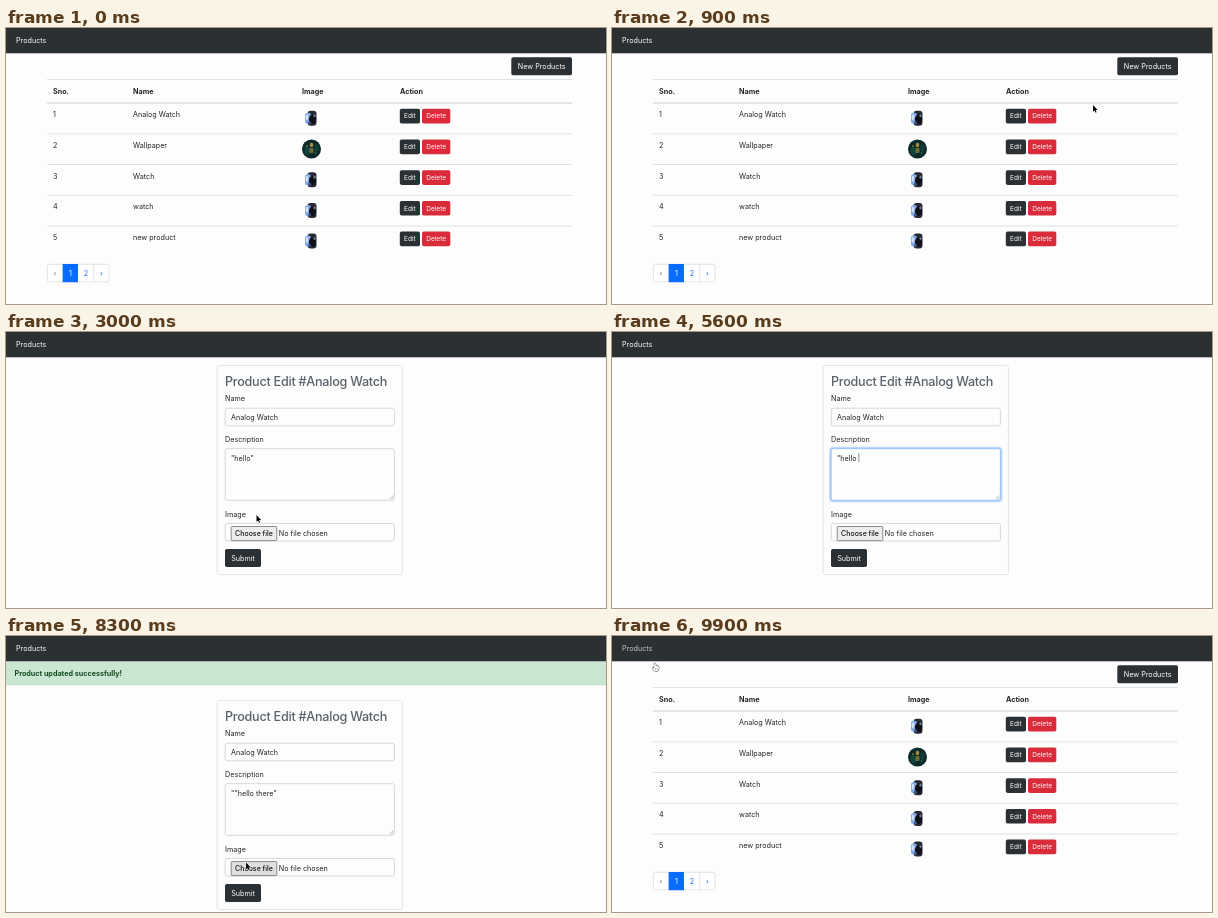
Animation, 600 px wide and 276 px high, one loop 10000 ms. Source, as an HTML page with a canvas:

```html
<!DOCTYPE html>
<html lang="en">
<head>
<meta charset="utf-8">
<title>Products</title>
<style>
  html, body { margin: 0; width: 100%; height: 100%; overflow: hidden; background: #fdfdfd; }
  canvas { display: block; width: 600px; height: 276px; }
</style>
</head>
<body>
<canvas id="stage"></canvas>
<script>
const W = 600, H = 276, LOOP = 10000, STEP = 100;
const FONT = 'Inter, Roboto, sans-serif';
const BODY = 7.2;
const C = {
  page: '#fdfdfd', dark: '#2b3035', darkHover: '#1d2125', red: '#d92b39', blue: '#0a6cff',
  text: '#212529', line: '#dadde0', field: '#cbd0d5', hover: '#e3e3e3',
  alert: '#cbe7d2', alertText: '#124d22', title: '#59626a'
};
const canvas = document.getElementById('stage');
const ctx = canvas.getContext('2d');
const ratio = window.devicePixelRatio || 1;
canvas.width = W * ratio;
canvas.height = H * ratio;

const ROW_TOP = 75, ROW_H = 30.7;
const rows = ['Analog Watch', 'Wallpaper', 'Watch', 'watch', 'new product'];

// Pointer path: time, x, y, shape; gaps in time are left hidden.
const paths = [
  [[300, 492, 257, 'arrow'], [600, 488, 160, 'arrow'], [900, 481, 77, 'arrow'],
   [1000, 481, 72, 'arrow'], [1300, 470, 81, 'arrow'], [1800, 404, 88, 'hand'],
   [2400, 404, 88, 'arrow'], [2600, 384, 53, 'arrow'], [3000, 250.5, 183, 'arrow'],
   [3300, 258, 150, 'beam'], [3500, 262, 140, 'beam'], [3900, 262, 140, 'beam']],
  [[6800, 262, 140, 'beam'], [7100, 254, 180, 'arrow'], [7500, 238, 230, 'hand'],
   [7900, 238, 232, 'arrow'], [8300, 240, 226.5, 'arrow'], [8900, 240, 73, 'arrow'],
   [9300, 26, 13, 'hand'], [9500, 26, 13, 'hand'], [9900, 43, 27, 'hand'], [10000, 43, 27, 'hand']]
];

function pointerAt(t) {
  for (const path of paths) {
    for (let i = 0; i < path.length - 1; i++) {
      const [t0, x0, y0, shape] = path[i], [t1, x1, y1] = path[i + 1];
      if (t >= t0 && t < t1) {
        const k = (t - t0) / (t1 - t0);
        return { x: x0 + (x1 - x0) * k, y: y0 + (y1 - y0) * k, shape };
      }
    }
  }
  return null;
}

function text(str, x, y, { size = BODY, weight = 400, color = C.text, align = 'left', track = 0 } = {}) {
  ctx.font = `${weight} ${size}px ${FONT}`;
  ctx.letterSpacing = track + 'px';
  ctx.textAlign = align;
  ctx.fillStyle = color;
  ctx.fillText(str, x, y + size * 0.36);
  return ctx.measureText(str).width;
}

function rect(x, y, w, h, color) {
  ctx.fillStyle = color;
  ctx.fillRect(x, y, w, h);
}

function box(x, y, w, h, r, fill, stroke, lw = 0.8) {
  ctx.beginPath();
  ctx.roundRect(x, y, w, h, r);
  if (fill) { ctx.fillStyle = fill; ctx.fill(); }
  if (stroke) { ctx.strokeStyle = stroke; ctx.lineWidth = lw; ctx.stroke(); }
}

function disc(x, y, rx, ry, color, turn = 0) {
  ctx.beginPath();
  ctx.ellipse(x, y, rx, ry, turn, 0, Math.PI * 2);
  ctx.fillStyle = color;
  ctx.fill();
}

function inside(p, x, y, w, h) {
  return p && p.x >= x && p.x <= x + w && p.y >= y && p.y <= y + h;
}

function button(label, x, y, w, h, color, p, size = BODY) {
  const over = inside(p, x, y, w, h) && p.shape === 'hand';
  box(x, y, w, h, 1.8, over && color === C.dark ? C.darkHover : color);
  text(label, x + w / 2, y + h / 2, { size, color: '#fff', align: 'center' });
}

function watch(x, y) {
  disc(x, y, 9.5, 9.5, '#fff');
  box(x - 4, y - 7.5, 9, 15, 3, '#252a35');
  box(x - 6.5, y - 5.5, 6, 11, 2.5, '#86a9e6');
  disc(x - 4.5, y - 1, 1.3, 3, '#d3e2fb');
  disc(x + 1, y + 1, 3.6, 4.8, '#0e1118');
  disc(x + 3, y - 2.5, 1.2, 1.4, '#6d7889');
  disc(x - 2, y + 4.5, 1.6, 1.6, '#3d5688');
}

function wallpaper(x, y) {
  disc(x, y, 9.5, 9.5, '#0c2a2a');
  disc(x - 4, y + 2, 3, 4, '#12443f');
  disc(x + 5, y - 1, 2.2, 4, '#123e3b');
  disc(x, y - 4, 1.8, 2.2, '#a98a38');
  box(x - 2, y - 1, 4, 5, 1, '#6e6a33');
  disc(x - 4.5, y - 3, 0.8, 0.8, '#c29a3e');
  disc(x + 4, y + 4, 0.8, 0.8, '#3a8a78');
}

function navbar(t) {
  rect(0, 0, W, 25, C.dark);
  rect(0, 25, W, 0.5, '#80848a');
  text('Products', 10, 12.6, { color: t >= 9200 ? '#c6c8ca' : '#fff' });
}

function listPage(p) {
  button('New Products', 505.3, 29.3, 60.7, 18, C.dark, p);
  rect(41, 51, 525, 0.8, C.line);
  const heads = { 'Sno.': 47, Name: 127, Image: 296, Action: 394 };
  for (const name in heads) text(name, heads[name], 63, { weight: 700 });

  rows.forEach((name, i) => {
    const top = ROW_TOP + i * ROW_H, mid = top + 11.8;
    const probe = p && { x: p.x, y: p.y - 3 };
    if (inside(probe, 41, top, 525, ROW_H - 0.1)) rect(41, top, 525, ROW_H, C.hover);
    rect(41, top - (i ? 0.2 : 0.6), 525, i ? 0.8 : 1.2, i ? C.line : '#d3d6d9');
    text(String(i + 1), 47, mid);
    text(name, 127, mid);
    (i === 1 ? wallpaper : watch)(305.5, top + 15.3);
    button('Edit', 393.8, top + 5.8, 20.2, 14.7, C.dark, p, 6.5);
    button('Delete', 416, top + 5.8, 28.3, 14.7, C.red, p, 6.5);
  });

  box(41.4, 236.3, 61.6, 17.6, 2, '#fff', C.line);
  rect(56.6, 236, 15.4, 18.2, C.blue);
  rect(87.4, 236.3, 0.8, 17.6, C.line);
  ['‹', '1', '2', '›'].forEach((s, i) => {
    const color = i === 0 ? '#5d666e' : i === 1 ? '#fff' : C.blue;
    text(s, 48.9 + i * 15.5, 245, { color, align: 'center' });
  });
}

function description(t) {
  if (t >= 7900) return '""hello there"';
  if (t < 3900) return '"hello"';
  if (t < 4100) return '"hello';
  const typed = t < 5800 ? 0 : Math.min(5, Math.floor((t - 5800) / 100) + 1);
  return '"hello ' + 'there'.slice(0, typed);
}

function caretOn(t) {
  if (t < 3500 || t >= 7700) return false;
  if (t < 4800 || (t >= 5800 && t < 6300)) return true;
  return Math.floor((t - 4800) / 500) % 2 === 1;
}

function editPage(t, p) {
  const saved = t >= 7900, dy = saved ? 31 : 0;
  if (saved) {
    rect(0, 25, W, 24, C.alert);
    rect(0, 48.5, W, 0.7, '#bcdcc5');
    text('Product updated successfully!', 8.5, 37.5, { weight: 700, color: C.alertText });
  }
  ctx.save();
  ctx.translate(0, dy);
  const q = p && { ...p, y: p.y - dy };

  box(211.2, 33.6, 185.2, 209, 2, C.page, '#dcdddf');
  text('Product Edit #Analog Watch', 219, 49.3, { size: 12.6, weight: 500, color: C.title, track: -0.25 });
  text('Name', 219, 66.8);
  box(219.2, 76.2, 169.2, 17.6, 2, C.page, C.field);
  text('Analog Watch', 225, 85.2);

  text('Description', 219, 107.2);
  const focus = t < 3500 || t >= 7700 ? 0 : Math.min(1, (t - 3400) / 300);
  if (focus) box(218.2, 115.7, 171.2, 53.6, 3, null, `rgba(10,120,255,${0.27 * focus})`, 2);
  box(219.2, 116.7, 169.2, 51.6, 2, C.page, focus ? '#82b7f8' : C.field);
  const w = text(description(t), 225, 126);
  if (caretOn(t)) rect(225 + w, 121, 0.6, 9, '#4a4d50');
  ctx.beginPath();
  ctx.moveTo(383.7, 167.2); ctx.lineTo(387.4, 163.5);
  ctx.moveTo(385.8, 167.2); ctx.lineTo(387.4, 165.6);
  ctx.strokeStyle = '#85888b';
  ctx.lineWidth = 0.6;
  ctx.stroke();

  text('Image', 219, 182);
  box(219.2, 191.4, 169.2, 17.6, 2, C.page, C.field);
  const over = inside(q, 225, 194, 46, 14.5);
  box(225.2, 194.5, 45.6, 14.1, 1, over ? '#dedede' : '#ededed', '#6f7276', 0.8);
  text('Choose file', 248, 201.8, { size: 7, weight: 500, color: '#111', align: 'center' });
  text('No file chosen', 272.8, 201.8);
  button('Submit', 219, 217, 36, 18, C.dark, q);
  ctx.restore();
}

function outline(points, fill, stroke, lw) {
  ctx.beginPath();
  points.forEach(([x, y]) => ctx.lineTo(x, y));
  ctx.closePath();
  ctx.lineJoin = 'round';
  ctx.strokeStyle = stroke;
  ctx.lineWidth = lw;
  ctx.stroke();
  ctx.fillStyle = fill;
  ctx.fill();
}

function drawPointer({ x, y, shape }) {
  ctx.save();
  ctx.translate(x, y);
  if (shape === 'arrow') {
    outline([[0, 0], [0, 6.8], [1.5, 5.4], [2.6, 7.8], [3.6, 7.3], [2.6, 5], [4.6, 4.9]], '#000', '#fff', 1);
  } else if (shape === 'hand') {
    outline([[-0.7, 0.4], [0, 0], [0.7, 0.5], [0.8, 2.5], [3.4, 3.2], [4, 4],
      [3.5, 7], [3, 8], [-0.6, 8], [-2.6, 5.2], [-2, 4.4], [-0.7, 5.2]], '#fff', '#222', 0.9);
    rect(0.6, 5, 0.4, 2, '#555');
    rect(1.9, 5, 0.4, 2, '#555');
  } else {
    rect(-0.3, -3.5, 0.7, 7, '#333');
    rect(-1.4, -4, 2.9, 0.6, '#333');
    rect(-1.4, 3.4, 2.9, 0.6, '#333');
  }
  ctx.restore();
}

function draw(t) {
  ctx.setTransform(ratio, 0, 0, ratio, 0, 0);
  rect(0, 0, W, H, C.page);
  const p = pointerAt(t);
  if (t >= 2200 && t < 9500) editPage(t, p);
  else listPage(p);
  navbar(t);
  if (p) drawPointer(p);
}

const start = performance.now();
function tick() {
  const t = (performance.now() - start) % LOOP;
  draw(Math.floor(t / STEP) * STEP);
  requestAnimationFrame(tick);
}
tick();
</script>
</body>
</html>
```
